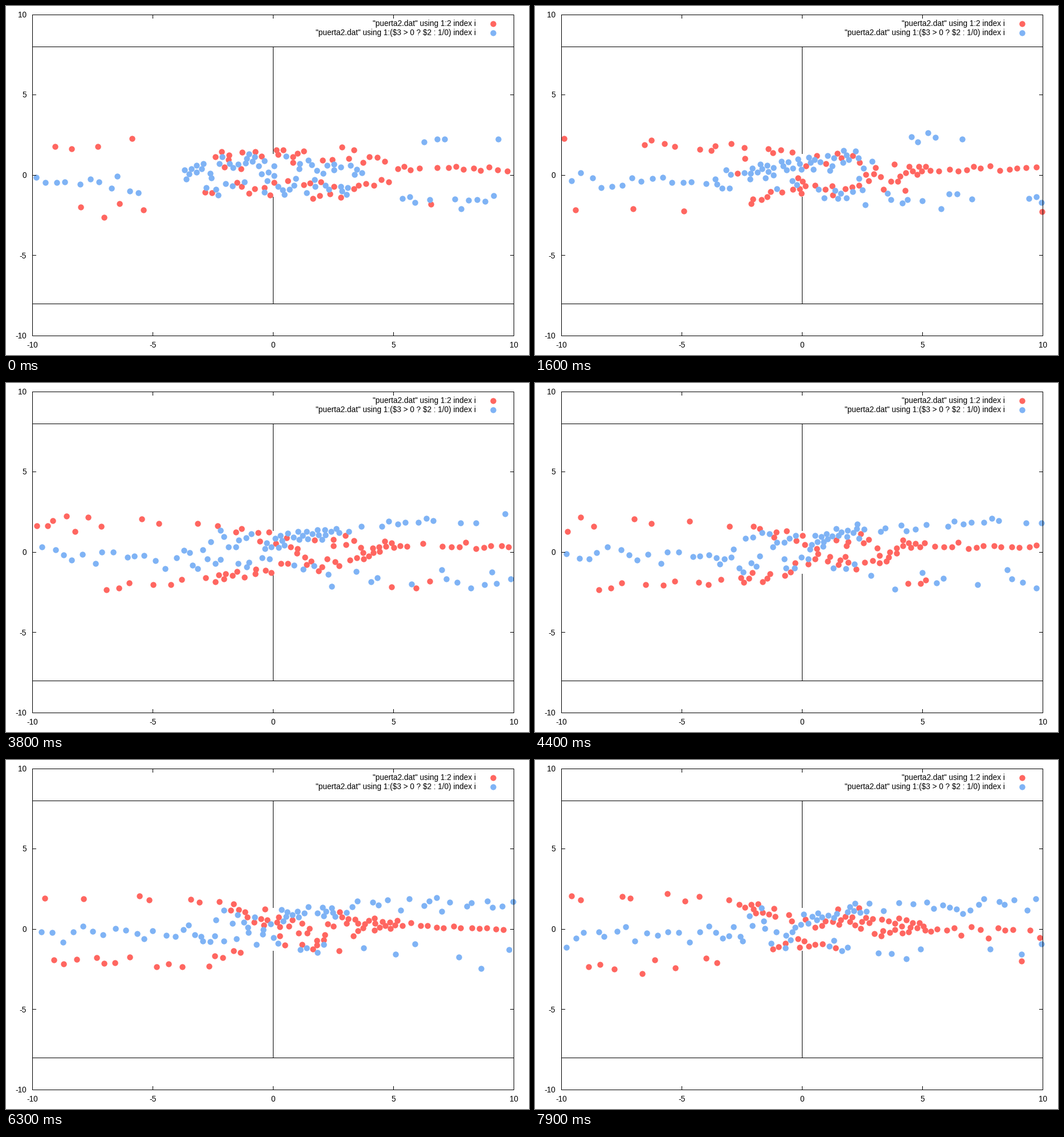
A matplotlib script that plays this animation: 917x611 px, repeating every 8000 ms.

```python
import numpy as np
import matplotlib.pyplot as plt
from matplotlib.animation import FuncAnimation

W, H, FRAMES = 917, 611, 80
RED, BLUE = "#ff6660", "#7fb3f5"
WALK, SPACE = 0.253, 0.3  # walking speed per frame, distance kept in the crowd
frames = np.arange(FRAMES)

# Two groups cross a doorway at x = 0. Along-track position p always grows:
# p = x for blue, p = -x for red. A walker is (entry time, p at time 0, y).


def times(rng, start, stop, gap):
    t = np.arange(start, stop, gap)
    return t + rng.uniform(-0.3, 0.3, t.size) * gap


def walk(person, te, ye, queue, rng):
    """Approach, shuffle through the crowd, be clear of it (p = 5) at te."""
    t0, p0, y0 = person
    knots, lane = [(t0, p0)], [(p0, y0)]
    if p0 == -10:
        knots.append((t0 + (10 - queue) / WALK, -queue))
        lane.append((-queue, y0))
    free = te - 2.5 / WALK
    if p0 < 2.4 and free > (2.5 - p0) / 0.35:
        knots.append((free, 2.5))
    knots += [(te, 5), (te + 60, 5 + 60 * WALK)]
    mid = rng.uniform(-1.4, 1.4)
    door = np.clip(0.4 * ye + 0.35 * mid, -1.15, 1.15)
    stops = [(-2.2, mid, -4), (0, door, -0.8), (2.5, 0.85 * ye, 1.5), (4.5, ye, 4.4)]
    lane += [(p, y) for p, y, limit in stops if p0 < limit]

    p = np.interp(frames, *zip(*knots))
    y = np.interp(p, *zip(*lane))
    sway = 0.1 * np.exp(-(p / 3.5) ** 4)
    f, g = rng.uniform(0.2, 0.5, 2)
    a, b = rng.uniform(0, 6.28, 2)
    p += sway * np.sin(f * frames + a)
    y += sway * np.sin(g * frames + b)
    p[frames < t0] = np.nan
    return p, y


def stream(side, crowd, arrivals, departed, queue, gap, exit_y, rng):
    paths = [(5 + WALK * (frames - t), np.full(FRAMES, exit_y(t))) for t in departed]
    people = [(0, p, y) for p, y in crowd]
    people += [(t, -10, y) for t, y in arrivals]
    leave = times(rng, 8, 8 + gap * (len(people) - 0.5), gap)
    for te in leave:
        ye = exit_y(te)
        # whoever is furthest ahead and close to that lane goes next
        who = min(people, key=lambda q: 0.6 * abs(q[2] - ye) - q[1] + WALK * q[0])
        people.remove(who)
        paths.append(walk(who, te, ye, queue, rng))
    p, y = np.swapaxes(paths, 0, 1)
    p[p > 10] = np.nan
    return side * p, y


def red_stream():
    rng = np.random.default_rng(4)

    def exit_y(t):
        return rng.normal(1.85, 0.25) if rng.random() < 0.55 else rng.normal(-2, 0.27)

    def entry_y(t):
        if rng.random() < 0.09:
            return rng.normal(-2.2, 0.3)
        late = np.interp(t, [50, 60], [0, 1])
        split = -0.5 * late * (rng.random() < 0.35)
        return np.interp(t, [0, 25, 50, 60], [0.4, 0.38, 0.25, 0]) + split + rng.normal(0, 0.09)

    p = np.linspace(-4.8, 2.7, 49)
    arm = np.where(rng.random(49) < 0.55, 1.3, -1) * rng.uniform(0.35, 1.4, 49)
    y = arm * np.interp(p, [-5, -3, 2.7], [0.5, 1, 1.1])
    arrivals = [(t, entry_y(t)) for t in times(rng, -19.5, FRAMES, 1.42)]
    return stream(-1, zip(p, y), arrivals, times(rng, -15.5, 0, 2), 5.2, 1.75, exit_y, rng)


def blue_stream():
    rng = np.random.default_rng(9)

    def exit_y(t):
        if rng.random() < np.interp(t, [-10, 20, 60], [0.2, 0.6, 0.8]):
            return np.interp(t, [0, 25, 42], [2, 2.3, 1.5]) + rng.normal(0, 0.27)
        return rng.normal(-1.7, 0.4)

    def entry_y(t):
        return rng.normal(np.interp(t, [0, 30], [-0.5, -0.25]), 0.33)

    p = np.linspace(-3.7, 3.6, 64)
    y = rng.uniform(-1.2, 1.2, 64) * np.interp(p, [-3.7, -2, 3.6], [0.4, 1, 1])
    arrivals = [(t, entry_y(t)) for t in times(rng, -17.5, FRAMES, 1.68)]
    return stream(1, zip(p, y), arrivals, times(rng, -17.5, 0, 1.25), 3.7, 1.17, exit_y, rng)


def spread(x, y):
    """Push apart walkers that stand closer than SPACE."""
    for n in frames:
        on = np.flatnonzero(np.isfinite(x[:, n]))
        pos = np.column_stack([x[on, n], y[on, n]])
        for _ in range(8):
            d = pos[:, None] - pos
            dist = np.hypot(d[..., 0], d[..., 1]) + 1e-6
            push = np.clip(SPACE - dist, 0, None) / dist
            pos += 0.3 * (push[..., None] * d).sum(axis=1)
        x[on, n], y[on, n] = pos.T
    return x, y


def px(x):
    return 468.5 + 42.2 * x


def py(y):
    return 296.5 - 28.1 * y


def crisp(v):
    return np.floor(np.asarray(v) - 0.01) + 0.5


fig = plt.figure(figsize=(W / 100, H / 100), dpi=100, facecolor="white")
ax = fig.add_axes([0, 0, 1, 1])
ax.set(xlim=(0, W), ylim=(H, 0))
ax.axis("off")


def line(x, y, z=1):
    ax.plot(crisp(x), crisp(y), color="black", lw=0.72, zorder=z, snap=False,
            solid_capstyle="projecting")


def label(x, y, s, ha):
    ax.text(x, y, s, ha=ha, va="baseline", family="Liberation Sans", size=9.8)


def dots(color, z, x=(), y=()):
    return ax.plot(x, y, "o", color=color, ms=7.5, mew=0, zorder=z, snap=False)[0]


L, R, T, B = px(-10), px(10), py(10), py(-10)
line([L, R, R, L, L], [T, T, B, B, T], 5)
for v in (-10, -5, 0, 5, 10):
    x, y = px(v), py(v)
    label(x - 0.5, 598, str(v), "center")
    label(36, y + 4.5, str(v), "right")
    if abs(v) < 10:
        for a, b in ((T, T + 6), (B, B - 6)):
            line([x, x], [a, b], 5)
        for a, b in ((L, L + 6), (R, R - 6)):
            line([a, b], [y, y], 5)
for s in (-1, 1):
    line([L, R], [py(8 * s)] * 2)
    line([px(0)] * 2, [py(8 * s), py(1.36 * s)])

label(824, 35, '"puerta2.dat" using 1:2 index i', "right")
label(824, 51, r'"puerta2.dat" using 1:(\$3 > 0 ? \$2 : 1/0) index i', "right")
dots(RED, 3, [853.5], [30.5])
dots(BLUE, 3, [853.5], [46.5])

(rx, ry), (bx, by) = red_stream(), blue_stream()
xs, ys = spread(np.vstack([rx, bx]), np.vstack([ry, by]))
xs, ys, reds = px(xs), py(ys), len(rx)
red, blue = dots(RED, 3), dots(BLUE, 4)


def draw(n):
    red.set_data(xs[:reds, n], ys[:reds, n])
    blue.set_data(xs[reds:, n], ys[reds:, n])
    return red, blue


anim = FuncAnimation(fig, draw, frames=FRAMES, interval=100, repeat=True, repeat_delay=0)
plt.show()
```
